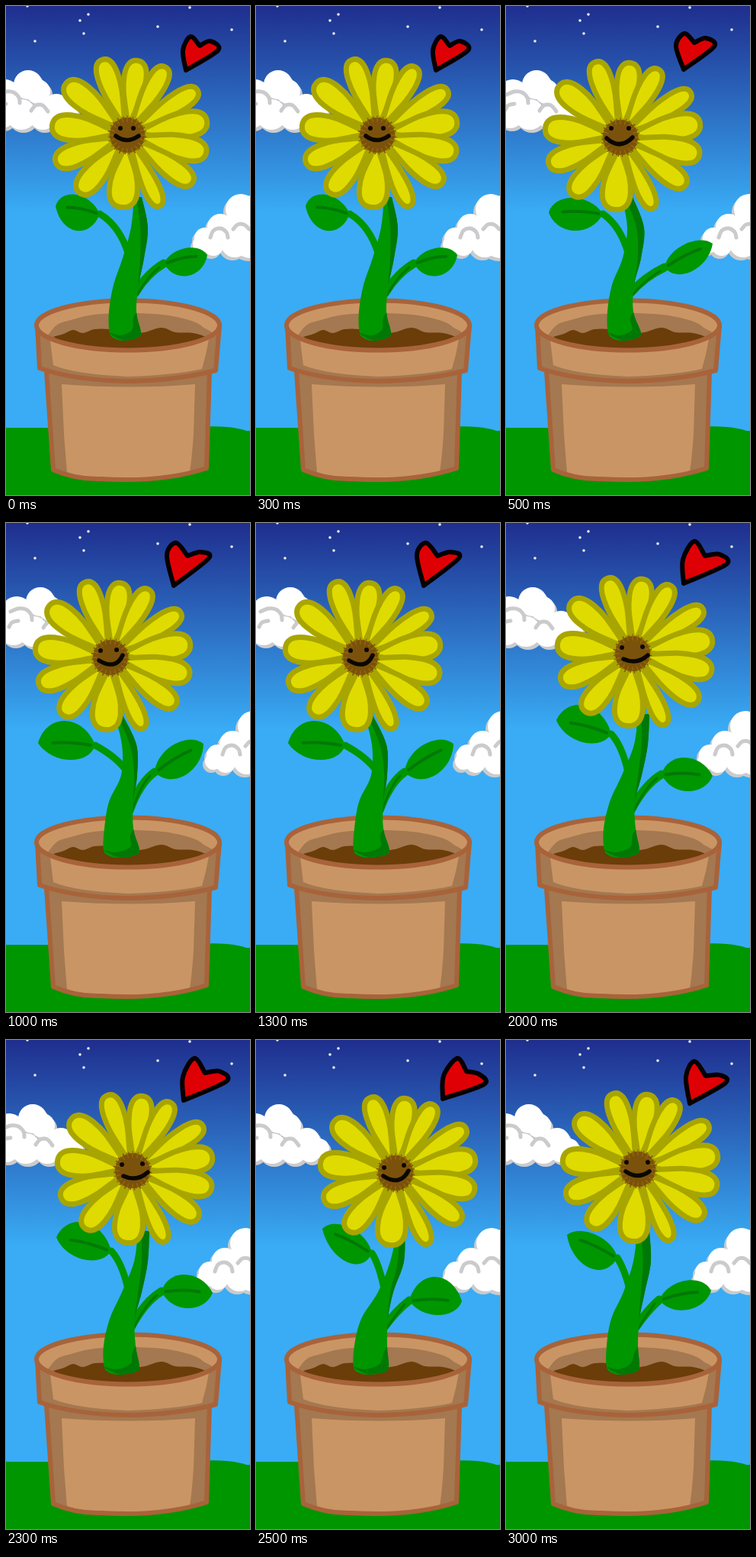
Write an HTML page with a canvas that moves like this. It is 320 px wide and 640 px high and loops after 3500 ms.

```html
<!DOCTYPE html>
<html lang="en">
<head>
<meta charset="utf-8">
<title>Swaying flower</title>
<style>
html, body { margin: 0; width: 100%; height: 100%; overflow: hidden; }
canvas { display: block; width: 100vw; height: 100vh; }
</style>
</head>
<body>
<canvas id="stage" width="320" height="640"></canvas>
<script>
const ctx = document.getElementById('stage').getContext('2d');
const STEP = 500;
const GREEN = '#009600', DARK_GREEN = '#007806';
const CLAY = '#ca9564', CLAY_SHADE = '#a47850', CLAY_LINE = '#a8633a';
const YELLOW = '#dfdb00', OLIVE = '#a9a500';
const STEM_Y = [250, 290, 330, 365, 400, 428];

// leaves: tip, top, inner end, bottom; heart: tip, left, left lobe, notch, right lobe, right
const poses = [
  { head: [0, 0], cloud: 0,
    left: [168, 164, 153, 141, 135, 136], right: [178, 186, 181, 174, 171, 177],
    leafL: [[65, 262], [92, 247], [123, 272], [92, 294]],
    leafR: [[264, 326], [235, 317], [207, 337], [239, 353]],
    heart: [[236, 84], [232, 58], [242, 40], [254, 52], [268, 46], [278, 58]],
    eyes: [[150, 160], [167, 160]], mouth: [[144, 170], [158, 181], [174, 170]] },
  { head: [-9, 3], cloud: 11,
    left: [152, 159, 153, 139, 133, 134], right: [166, 181, 177, 168, 167, 177],
    leafL: [[56, 270], [88, 251], [127, 272], [90, 294]],
    leafR: [[271, 311], [234, 312], [208, 342], [244, 347]],
    heart: [[233, 83], [223, 52], [234, 36], [247, 48], [262, 42], [273, 53]],
    eyes: [[138, 160], [161, 160]], mouth: [[132, 173], [149, 189], [166, 172]] },
  { head: [-22, 7], cloud: 16,
    left: [142, 152, 151, 135, 129, 128], right: [152, 171, 172, 167, 167, 175],
    leafL: [[42, 288], [78, 259], [117, 291], [83, 310]],
    leafR: [[259, 289], [220, 290], [195, 326], [235, 330]],
    heart: [[220, 82], [211, 42], [223, 26], [238, 43], [255, 38], [266, 46]],
    eyes: [[124, 167], [145, 166]], mouth: [[122, 180], [144, 193], [153, 173]] },
  { head: [-10, 2], cloud: 11,
    left: [157, 161, 151, 136, 130, 129], right: [163, 181, 178, 167, 167, 173],
    leafL: [[40, 263], [80, 246], [126, 284], [83, 294]],
    leafR: [[270, 308], [235, 298], [203, 330], [240, 342]],
    heart: [[222, 83], [220, 46], [236, 21], [247, 41], [265, 41], [274, 51]],
    eyes: [[135, 161], [158, 161]], mouth: [[132, 173], [149, 185], [165, 173]] },
  { head: [7, 2], cloud: 6,
    left: [173, 168, 152, 136, 128, 129], right: [188, 186, 178, 169, 170, 175],
    leafL: [[66, 258], [104, 239], [138, 276], [101, 287]],
    leafR: [[271, 331], [235, 307], [204, 329], [238, 351]],
    heart: [[233, 79], [232, 48], [247, 24], [261, 43], [280, 41], [289, 54]],
    eyes: [[152, 163], [179, 162]], mouth: [[154, 178], [172, 186], [186, 173]] },
  { head: [24, 5], cloud: 1,
    left: [185, 176, 160, 138, 129, 128], right: [195, 194, 180, 173, 172, 174],
    leafL: [[87, 247], [124, 246], [152, 279], [118, 290]],
    leafR: [[270, 342], [235, 310], [201, 341], [238, 360]],
    heart: [[245, 77], [246, 47], [264, 24], [276, 41], [293, 45], [299, 58]],
    eyes: [[168, 167], [194, 164]], mouth: [[167, 178], [189, 192], [200, 171]] },
  { head: [14, 0], cloud: 1,
    left: [172, 167, 154, 138, 132, 132], right: [188, 190, 182, 175, 173, 175],
    leafL: [[80, 255], [118, 255], [146, 285], [109, 298]],
    leafR: [[269, 328], [235, 315], [201, 340], [238, 353]],
    heart: [[241, 83], [236, 48], [247, 28], [262, 47], [281, 46], [288, 56]],
    eyes: [[158, 160], [186, 160]], mouth: [[157, 172], [173, 183], [188, 172]] }
];

// tip x, tip y, half width
const petals = [
  [125, 67, 17], [173, 68, 18], [211, 77, 16], [254, 108, 16], [267, 150, 20],
  [266, 193, 19], [247, 234, 17], [203, 265, 14], [152, 267, 22], [94, 247, 18],
  [62, 206, 18], [57, 156, 20], [76, 99, 19]
];
const cloudL = [[29, 103, 19], [-2, 116, 20], [42, 112, 16], [66, 132, 17], [82, 142, 13],
  [70, 147, 13], [48, 144, 18], [20, 142, 20], [-6, 142, 18]];
const cloudR = [[308, 266, 20], [281, 289, 17], [261, 304, 14], [256, 312, 11], [272, 314, 13],
  [300, 311, 18], [322, 300, 30], [335, 285, 40]];

const mix = (a, b, t) => a + (b - a) * t;

function disc(x, y, r, color) {
  ctx.fillStyle = color;
  ctx.beginPath();
  ctx.arc(x, y, r, 0, Math.PI * 2);
  ctx.fill();
}

// Catmull-Rom segments through the points of an open curve
function curve(path, pts, start = true) {
  if (start) path.moveTo(...pts[0]);
  for (let i = 0; i < pts.length - 1; i++) {
    const a = pts[i - 1] || pts[i], b = pts[i], c = pts[i + 1], d = pts[i + 2] || c;
    path.bezierCurveTo(b[0] + (c[0] - a[0]) / 6, b[1] + (c[1] - a[1]) / 6,
      c[0] - (d[0] - b[0]) / 6, c[1] - (d[1] - b[1]) / 6, c[0], c[1]);
  }
  return path;
}

function blob(pts, color) {
  ctx.fillStyle = color;
  ctx.fill(curve(new Path2D(), pts));
}

function line(pts, width, color) {
  ctx.strokeStyle = color;
  ctx.lineWidth = width;
  ctx.stroke(curve(new Path2D(), pts));
}

function bend(a, c, b, width, color) {
  ctx.strokeStyle = color;
  ctx.lineWidth = width;
  ctx.beginPath();
  ctx.moveTo(...a);
  ctx.quadraticCurveTo(...c, ...b);
  ctx.stroke();
}

function drawSky() {
  const sky = ctx.createLinearGradient(0, 0, 0, 270);
  sky.addColorStop(0, '#1f2e8e');
  sky.addColorStop(1, '#39acf5');
  ctx.fillStyle = sky;
  ctx.fillRect(0, 0, 320, 640);
  for (const [x, y] of [[28, 0], [108, 11], [97, 19], [102, 36], [38, 46], [199, 27], [241, 2], [296, 31]])
    disc(x, y, 1.8, '#eef3e4');
}

function drawCloud(puffs, lean, arcs) {
  for (const [x, y, r] of puffs) disc(x + lean, y + 4, r, '#cbcbcd');
  for (const [x, y, r] of puffs) disc(x, y, r, '#fff');
  for (const arc of arcs) line(arc, 5, '#cbcbcd');
}

function drawClouds(dx) {
  ctx.save();
  ctx.translate(dx, 0);
  drawCloud(cloudL, 3, [
    [[-10, 116], [0, 112], [10, 113], [17, 120], [18, 127]],
    [[-12, 136], [-8, 130], [0, 128]],
    [[33, 137], [39, 130], [48, 130], [55, 138]]
  ]);
  drawCloud(cloudR, -3, [
    [[268, 303], [272, 294], [281, 291], [289, 296], [291, 303]],
    [[298, 292], [304, 286], [312, 286], [319, 292]]
  ]);
  ctx.restore();
}

function drawPot() {
  blob([[0, 552], [160, 553], [320, 558], [320, 640], [0, 640], [0, 552]], GREEN);
  ctx.fillStyle = GREEN;
  ctx.fillRect(0, 556, 320, 84);

  const body = new Path2D('M53 478L62 607Q92 620 125 619Q205 624 263 605L267 478Z');
  ctx.fillStyle = CLAY;
  ctx.fill(body);
  ctx.fillStyle = CLAY_SHADE;
  ctx.fill(new Path2D('M54 480L64 607L80 611L76 560L73 495Q165 502 248 495L246 560Q244 590 241 610L262 604L267 480Z'));
  ctx.strokeStyle = CLAY_LINE;
  ctx.lineWidth = 6;
  ctx.stroke(body);

  const band = new Path2D('M41 418L44 474Q90 490 160 491Q225 490 275 477L280 418Z');
  ctx.fillStyle = CLAY;
  ctx.fill(band);
  ctx.fillStyle = CLAY_SHADE;
  ctx.fill(new Path2D('M42 423L58 438L62 470Q90 482 160 485Q220 483 257 475Q263 455 266 436L279 425L275 478Q220 491 160 491Q85 489 44 474Z'));
  ctx.strokeStyle = CLAY_LINE;
  ctx.stroke(band);

  ctx.fillStyle = CLAY;
  ctx.beginPath();
  ctx.ellipse(160, 418, 120, 32.5, 0, 0, Math.PI * 2);
  ctx.fill();
  ctx.save();
  ctx.clip();
  blob([[50, 438], [66, 418], [85, 411], [115, 404], [160, 402], [205, 404], [240, 411],
    [258, 420], [268, 436], [160, 456], [50, 438]], CLAY_SHADE);
  blob([[62, 433], [76, 429], [88, 424], [101, 428], [116, 423], [135, 423], [165, 428], [182, 427],
    [204, 421], [222, 427], [245, 428], [261, 434], [240, 443], [160, 452], [85, 444], [62, 433]], '#6b3d08');
  ctx.restore();
  ctx.beginPath();
  ctx.ellipse(160, 418, 120, 32.5, 0, 0, Math.PI * 2);
  ctx.stroke();
}

function leafSide(path, a, mid, b) {
  const control = (i, k) => {
    const m = (a[i] + b[i]) / 2;
    return m + (mid[i] - m) * 4 / 3 + k * (b[i] - a[i]);
  };
  path.bezierCurveTo(control(0, -.32), control(1, -.32), control(0, .32), control(1, .32), ...b);
}

function drawLeaf([tip, top, end, bottom]) {
  const path = new Path2D();
  path.moveTo(...tip);
  leafSide(path, tip, top, end);
  leafSide(path, end, bottom, tip);
  ctx.fillStyle = GREEN;
  ctx.fill(path);
  const at = (t, lift) => [mix(end[0], tip[0], t), mix(end[1], tip[1], t) - lift];
  bend(at(.08, 0), at(.45, 4), at(.74, 1), 4, DARK_GREEN);
}

function drawStem({ left, right, leafL, leafR }) {
  const endL = leafL[2], endR = leafR[2];
  const jointL = [left[2] + 8, 326];
  bend(endL, [mix(endL[0], left[2], .75) + 4, endL[1] + 16], jointL, 9, GREEN);
  const bendR = [right[2] + 4, endR[1] + 13], jointR = [right[3] - 5, 376];
  bend(endR, bendR, jointR, 11, GREEN);
  bend([endR[0] - 6, endR[1] + 5], [bendR[0], bendR[1] + 5], [jointR[0] + 3, jointR[1] + 2], 3, DARK_GREEN);

  const side = xs => xs.map((x, i) => [x, STEM_Y[i]]);
  const base = [mix(left[5], right[5], .45), 438];
  const stem = curve(new Path2D(), [...side(left), [left[5] + 8, 436], base, [right[5] - 7, 435], ...side(right).reverse()]);
  ctx.fillStyle = GREEN;
  ctx.fill(stem);
  ctx.save();
  ctx.clip(stem);
  const inner = [.3, .55, .82, 1].map((t, i) => [mix(left[i], right[i], t), STEM_Y[i]]);
  blob([...inner, [right[3] + 9, 350], [right[2] + 9, 320], [right[1] + 9, 290], [right[0] + 9, 250]], DARK_GREEN);
  blob([[right[4] + 6, 393], [right[4] - 4, 408], [right[5] - 12, 424], [left[5] + 15, 431],
    [left[5], 428], base, [right[5] + 9, 440], [right[4] + 6, 393]], DARK_GREEN);
  ctx.restore();
  drawLeaf(leafL);
  drawLeaf(leafR);
}

function drawPetal([x, y, w]) {
  ctx.save();
  ctx.translate(159, 168);
  ctx.rotate(Math.atan2(y - 168, x - 159));
  ctx.translate(20, 0);
  const n = Math.hypot(x - 159, y - 168) - 23.5;
  const h = w - 3.5;
  ctx.beginPath();
  ctx.moveTo(0, -3);
  ctx.bezierCurveTo(n * .3, -h * .65, n * .45, -h, n * .7, -h);
  ctx.bezierCurveTo(n * .91, -h, n, -h * .6, n, 0);
  ctx.bezierCurveTo(n, h * .6, n * .91, h, n * .7, h);
  ctx.bezierCurveTo(n * .45, h, n * .3, h * .65, 0, 3);
  ctx.closePath();
  ctx.fillStyle = YELLOW;
  ctx.fill();
  ctx.strokeStyle = OLIVE;
  ctx.lineWidth = 7;
  ctx.stroke();
  ctx.restore();
}

function drawHead({ head, eyes, mouth }) {
  ctx.save();
  ctx.translate(...head);
  disc(159, 168, 45, OLIVE);
  petals.forEach(drawPetal);
  disc(159, 169, 23, '#7b520c');
  for (let i = 0; i < 60; i++) {
    const a = i * Math.PI / 30, r = 23.5 + 1.8 * Math.sin(i * 2.4);
    const ray = d => [159 + d * Math.cos(a), 169 + d * Math.sin(a)];
    line([ray(18), ray(r)], 1.5, i % 3 ? '#7b520c' : '#916909');
  }
  ctx.restore();
  for (const [x, y] of eyes) disc(x, y, 3, '#0b0800');
  bend(...mouth, 5.5, '#0b0800');
}

function drawHeart(p) {
  const path = curve(new Path2D(), p.slice(0, 4));
  curve(path, [p[3], p[4], p[5], p[0]], false);
  path.closePath();
  ctx.fillStyle = '#df0005';
  ctx.fill(path);
  ctx.strokeStyle = '#060000';
  ctx.lineWidth = 6;
  ctx.stroke(path);
}

function draw(now) {
  const pose = poses[Math.floor(now / STEP) % poses.length];
  ctx.lineCap = ctx.lineJoin = 'round';
  drawSky();
  drawClouds(pose.cloud);
  drawPot();
  drawStem(pose);
  drawHead(pose);
  drawHeart(pose.heart);
}

const begin = performance.now();
function tick() {
  draw(performance.now() - begin);
  requestAnimationFrame(tick);
}
tick();
</script>
</body>
</html>
```
